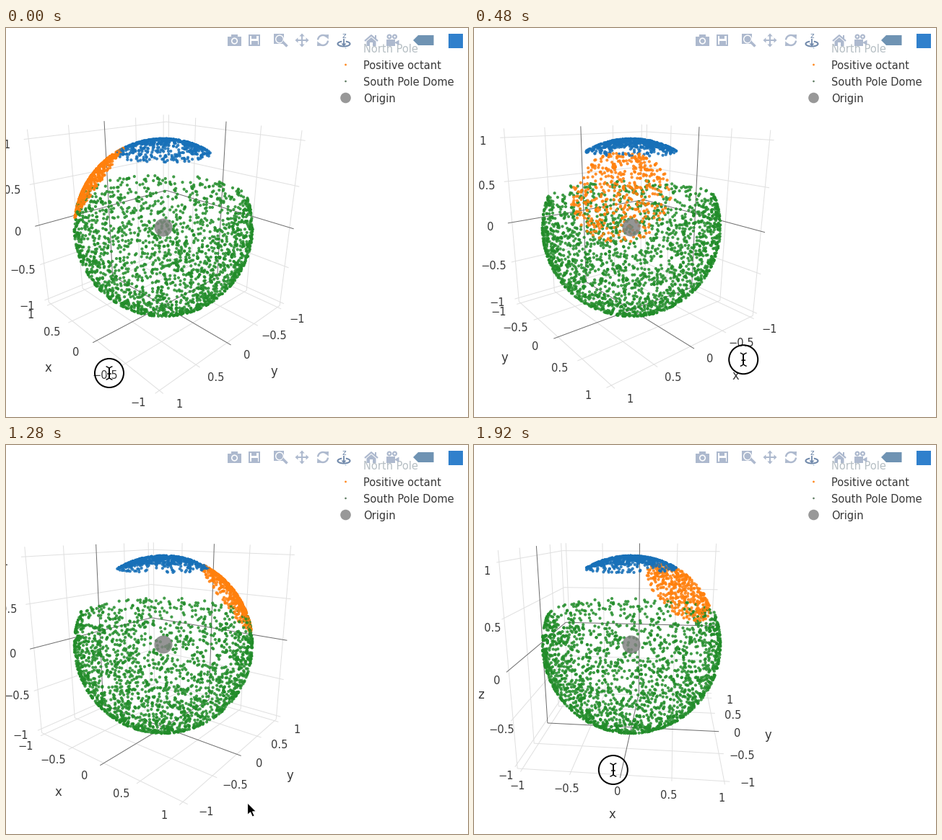
A matplotlib script for the animation above (2000 ms loop, 640 px wide and 540 px high).

```python
import numpy as np
import matplotlib.pyplot as plt
from matplotlib.animation import FuncAnimation
from matplotlib.collections import LineCollection
from matplotlib.patches import Arc, Circle, Polygon, Rectangle

W, H, DPI = 640, 540, 100
FRAMES, STEP = 25, 80
CX, CY, FOCAL, DIST = 218, 277, 556, 4.616
SIDE, TOP = 1.052, 1.10
TICKS = np.linspace(-1, 1, 5)
PX = 72 / DPI
ICON, ACTIVE, INK = "#adb9ce", "#7089ab", "#383838"

plt.rcParams["font.family"] = "DejaVu Sans"
fig = plt.figure(figsize=(W / DPI, H / DPI), dpi=DPI, facecolor="white")
ax = fig.add_axes([0, 0, 1, 1])
ax.set_xlim(0, W)
ax.set_ylim(H, 0)
ax.axis("off")


# Motion, timed in frames: three drags turn the scene, the pointer returns between them
def ease(i, start, end):
    u = np.clip((i - start) / (end - start), 0, 1)
    return u * u * (3 - 2 * u)


def azimuth(i):
    return (136.5 - 98.8 * ease(i, 1.3, 7.5) - 91.7 * ease(i, 10.8, 16.5)
            - 60 * ease(i, 21, 27))


def elevation(i):
    return 22 - 6.1 * ease(i, 3.8, 6.5)


MOVES = [(1.3, 7.5, (270, -22)), (7.5, 10, (-280, 27)), (10.5, 15, (235, 18)),
         (14.9, 20.5, (-332, -51)), (21, 26, (242, 0))]
PRESSES = [(-1, 8), (11, 16), (21, FRAMES)]


def pointer(i):
    return np.array([143, 479]) + sum(ease(i, a, b) * np.array(d) for a, b, d in MOVES)


def ring_radius(i):
    for start, end in PRESSES:
        if start <= i < end:
            return 27 if i == start else 20
    return 0


# Camera
class Camera:
    def __init__(self, az, el):
        a, e = np.radians([az, el])
        self.right = np.array([-np.sin(a), np.cos(a), 0])
        self.toward = np.array([np.cos(a) * np.cos(e), np.sin(a) * np.cos(e), np.sin(e)])
        self.up = np.cross(self.toward, self.right)
        self.sx, self.sy = np.sign(np.cos(a)), np.sign(np.sin(a))

    def depth(self, p):
        return np.asarray(p) @ self.toward

    def project(self, p):
        p = np.asarray(p, float)
        k = FOCAL / (DIST - self.depth(p))
        return np.stack([CX + k * (p @ self.right), CY - k * (p @ self.up)], axis=-1)

    def slope(self, p, out):
        h = 1e-3
        return (self.project(np.add(p, np.multiply(h, out))) - self.project(p)) / h


def wall_lines(cam, t):
    s, bx, by = SIDE, -cam.sx * SIDE, -cam.sy * SIDE
    return cam.project([
        [(t, -s, -s), (t, s, -s)],
        [(-s, t, -s), (s, t, -s)],
        [(t, by, -s), (t, by, TOP)],
        [(bx, t, -s), (bx, t, TOP)],
        [(-s, by, t), (s, by, t)],
        [(bx, -s, t), (bx, s, t)],
    ])


def axis_rows(cam):
    """For each axis: a function from tick to edge point, and the outward direction."""
    ex, ey = cam.sx * SIDE, cam.sy * SIDE
    out_x, out_y = (0, cam.sy, 0), (cam.sx, 0, 0)
    corner, out_z = (ex, -ey), out_y
    if np.dot(cam.right[:2], corner) > 0:
        corner, out_z = (-ex, ey), out_x
    return [
        (lambda t: (t, ey, -SIDE), out_x),
        (lambda t: (ex, t, -SIDE), out_y),
        (lambda t: (*corner, t), out_z),
    ]


# Point clouds on the unit sphere
rng = np.random.default_rng(7)


def cap(n, axis, low):
    axis = np.array(axis, float) / np.linalg.norm(axis)
    u = np.cross(axis, (1, 0, 0))
    u /= np.linalg.norm(u)
    v = np.cross(axis, u)
    c = rng.uniform(low, 1, n)[:, None]
    phi = rng.uniform(0, 2 * np.pi, n)[:, None]
    return c * axis + np.sqrt(1 - c * c) * (np.cos(phi) * u + np.sin(phi) * v)


clouds = [
    (cap(500, (0, 0, 1), np.cos(np.pi / 6)), (0.09, 0.44, 0.72, 0.87)),
    (cap(450, (1, 0.96, 1.02), np.cos(np.radians(28.5))), (1.00, 0.50, 0.05, 0.87)),
    (cap(2000, (0, 0, -1), -0.39), (0.13, 0.55, 0.16, 0.85)),
]
points = np.vstack([p for p, _ in clouds])
colors = np.vstack([np.tile(c, (len(p), 1)) for p, c in clouds])


# Drawing helpers
def label(x, y, text, px=14.6, color=INK, ha="left", z=4):
    return ax.text(x, y, text, fontsize=px * PX, color=color, ha=ha,
                   va="center_baseline", zorder=z)


def fill(pts, color=ICON):
    ax.add_patch(Polygon(pts, closed=True, fc=color, ec="none", zorder=6))


def box(x, y, w, h, color=ICON):
    ax.add_patch(Rectangle((x, y), w, h, fc=color, ec="none", zorder=6))


def dot(x, y, r, color=ICON):
    ax.add_patch(Circle((x, y), r, fc=color, ec="none", zorder=6))


def stroke(xs, ys, color=ICON, px=2):
    ax.plot(xs, ys, color=color, lw=px * PX, solid_capstyle="butt", zorder=6)


def arc(x, y, w, h, start, end, color=ICON, px=2):
    ax.add_patch(Arc((x, y), w, h, theta1=start, theta2=end, color=color,
                     lw=px * PX, zorder=6))


def head(x, y, angle, color=ICON, size=4):
    """Arrow head with its tip at (x, y), angle in degrees."""
    a = np.radians(angle)
    d, n = np.array([np.cos(a), np.sin(a)]), np.array([-np.sin(a), np.cos(a)])
    tip = np.array([x, y])
    fill([tip, tip - size * (d + 0.9 * n), tip - size * (d - 0.9 * n)], color)


def draw_legend():
    rows = [("North Pole", "#b6bfc4", "#c5d9ea", 1),
            ("Positive octant", INK, "#ff8a20", 1.4),
            ("South Pole Dome", INK, "#5c7a60", 1.3),
            ("Origin", INK, "#989898", 7.3)]
    for k, (text, ink, mark, r) in enumerate(rows):
        y = 28 + 23 * k
        label(495, y, text, color=ink)
        dot(470.5, y, r, mark)


def draw_toolbar():
    # photo camera
    box(307, 12, 19, 13)
    box(312, 9, 9, 4)
    dot(316.5, 18, 4.6, "white")
    dot(316.5, 18, 3)
    # disk
    box(336, 9, 16, 16)
    box(338, 11, 12, 12, "white")
    box(340, 10, 7, 5)
    box(339.5, 18, 9, 6)
    # magnifier
    box(371, 8, 14, 14)
    dot(379, 15.5, 6, "white")
    dot(379, 15.5, 4.6)
    stroke([383, 389.5], [19, 25.5], px=3.5)
    # pan
    stroke([403, 417], [17, 17])
    stroke([410, 410], [10, 24])
    for q in range(4):
        dx, dy = np.cos(q * np.pi / 2), np.sin(q * np.pi / 2)
        head(410 + 9.5 * dx, 17 + 9.5 * dy, 90 * q)
    # orbit
    for q in (0, 180):
        arc(439, 17, 14, 14, q + 5, q + 140, px=2.4)
    head(447, 9, -45, size=5)
    head(431, 25, 135, size=5)
    # turntable
    label(468, 10.5, "z", 10.5, ACTIVE, "center", 6)
    arc(468, 22, 17, 7, 310, 230, ACTIVE)
    stroke([468, 468], [14.5, 24], ACTIVE, 1.8)
    head(468, 25.5, 90, ACTIVE)
    # home
    stroke([497, 506, 515], [18, 10.2, 18], px=2.2)
    box(511, 9.5, 2.3, 5)
    fill([(499.5, 25), (499.5, 18.5), (506, 13), (512.5, 18.5), (512.5, 25)])
    box(504, 20, 4, 5, "white")
    # film camera
    for x in (531, 538.5):
        dot(x, 12, 3.5)
        dot(x, 12, 1.3, "white")
    box(527, 16, 12, 8.5)
    fill([(538, 20.3), (544.5, 16.5), (544.5, 24)])
    # tag
    fill([(564, 17), (571, 10), (592.5, 10), (592.5, 24), (571, 24)], "#6f93b3")
    box(613, 7.5, 20, 20, "#3080cc")


draw_legend()
draw_toolbar()

# Moving parts
grid = LineCollection([], colors="#e0e0e0", linewidths=PX, zorder=1)
zero = LineCollection([], colors="#6e6e6e", linewidths=PX, zorder=1.5)
ax.add_collection(grid)
ax.add_collection(zero)
cloud = ax.scatter(points[:, 0], points[:, 1], s=(4.2 * PX) ** 2, c=colors,
                   linewidths=0, zorder=2)
ax.add_patch(Circle((CX, CY), 12.5, fc="#808080", ec="none", alpha=0.83, zorder=3))


def tick_text(t):
    return f"{t:g}".replace("-", "\u2212")


tick_labels = [[label(0, 0, tick_text(t), ha="center") for t in TICKS] for _ in "xyz"]
titles = [label(0, 0, name, 16.5, ha="center") for name in "xyz"]

ARROW = np.array([(0, 0), (0, 16.5), (4, 13), (6.7, 19.2), (9.6, 18), (6.9, 12), (12, 12)])


def beam_shape():
    y = np.linspace(-9, 9, 19)
    bend = np.clip(np.abs(y) - 6, 0, None) ** 2 * 0.42
    gap = [[np.nan, np.nan]]
    return np.concatenate([np.c_[-bend, y], gap, np.c_[bend, y], gap, [[-2.2, 1], [2.2, 1]]])


BEAM = beam_shape()
arrow = Polygon(ARROW, closed=True, fc="black", ec="white", lw=PX, zorder=9)
ring = Circle((0, 0), 20, fill=False, ec="black", lw=2 * PX, zorder=8)
ax.add_patch(arrow)
ax.add_patch(ring)
halo, = ax.plot([], [], color="white", lw=3 * PX, zorder=8.5)
beam, = ax.plot([], [], color="black", lw=1.4 * PX, zorder=9)


def place_axes(cam):
    grid.set_segments(np.concatenate([wall_lines(cam, t) for t in TICKS if t]))
    zero.set_segments(wall_lines(cam, 0))
    for (edge, out), texts, title in zip(axis_rows(cam), tick_labels, titles):
        shift = cam.slope(edge(0), out)
        for t, text in zip(TICKS, texts):
            text.set_position(cam.project(edge(t)) + 0.215 * shift)
        title.set_position(cam.project(edge(0)) + 0.58 * shift)


def place_pointer(i):
    at, r = pointer(i), ring_radius(i)
    dragging = r == 20
    ring.set_center(at)
    ring.set_radius(r)
    ring.set_visible(r > 0)
    arrow.set_xy(ARROW + at)
    arrow.set_visible(not dragging)
    for line in (halo, beam):
        line.set_data(*(BEAM + at).T)
        line.set_visible(dragging)


def draw(i):
    cam = Camera(azimuth(i), elevation(i))
    order = np.argsort(cam.depth(points))
    cloud.set_offsets(cam.project(points[order]))
    cloud.set_facecolors(colors[order])
    place_axes(cam)
    place_pointer(i)
    return []


anim = FuncAnimation(fig, draw, frames=FRAMES, interval=STEP, repeat=True, repeat_delay=0)
plt.show()
```
